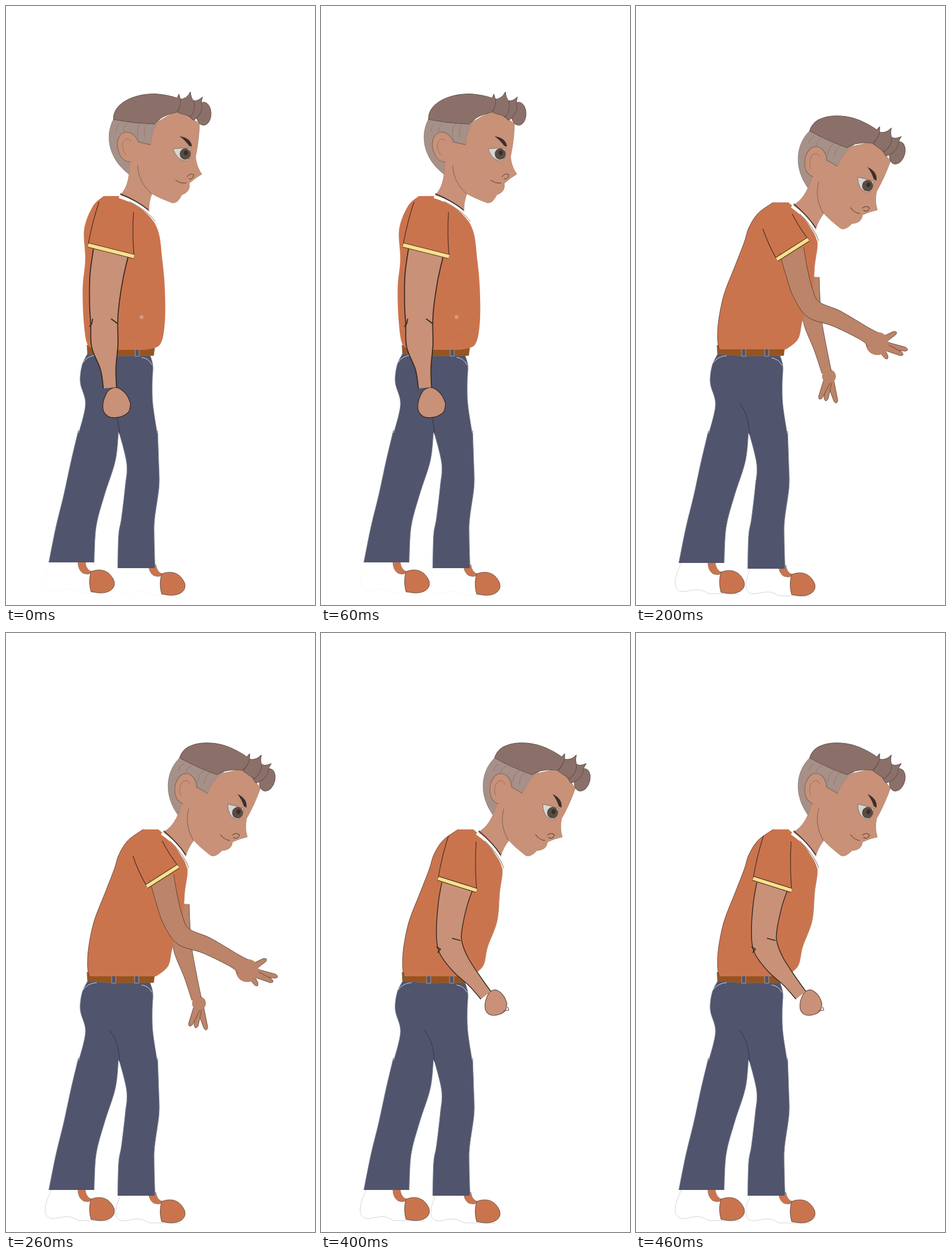
An HTML page that plays this animation: 538 by 1040 pixels, repeating every 500 ms.

```html
<!DOCTYPE html>
<html lang="en">
<head>
<meta charset="utf-8">
<title>Leaning man</title>
<style>
  html, body { margin: 0; width: 100%; height: 100%; overflow: hidden; background: #fff; }
  svg { display: block; width: 100vw; height: 100vh; }
  path { stroke-linejoin: round; }
</style>
</head>
<body>
<svg id="stage" viewBox="0 0 538 1040"></svg>
<script>
const SHIRT = '#ca744e', SKIN = '#c89178', SHADE = '#bc8468', JEANS = '#50546d';
const HAIR = '#8a7069', SIDE = '#a69087', BELT = '#96541f', TRIM = '#fbe08c', INK = '#33271f';
const STEP = 100;

const shape = (d, fill, stroke = 'none', width = 1) =>
  `<path d="${d}" fill="${fill}" stroke="${stroke}" stroke-width="${width}"/>`;
const line = (d, stroke = INK, width = 1) => shape(d, 'none', stroke, width);
const ellipse = (x, y, rx, ry, fill, stroke = 'none') =>
  `<ellipse cx="${x}" cy="${y}" rx="${rx}" ry="${ry}" fill="${fill}" stroke="${stroke}"/>`;
const group = (transform, body) => `<g transform="${transform}">${body}</g>`;

// Smooth curve through points, without its opening move.
function through(points) {
  const at = i => points[Math.max(0, Math.min(points.length - 1, i))];
  return points.slice(1).map((c, i) => {
    const b = at(i);
    const out = b.map((v, k) => v + (c[k] - at(i - 1)[k]) / 6);
    const into = c.map((v, k) => v - (at(i + 2)[k] - b[k]) / 6);
    return `C${out} ${into} ${c}`;
  }).join('');
}

// Band along joints [x, y, width]; a flat band measures its width horizontally.
function ribbon(joints, flat, fill, leftInk, rightInk = leftInk, width = 1) {
  const side = sign => joints.map(([x, y, w], i) => {
    const a = joints[Math.max(0, i - 1)], b = joints[Math.min(joints.length - 1, i + 1)];
    const angle = flat ? Math.PI / 2 : Math.atan2(b[1] - a[1], b[0] - a[0]);
    return [x - sign * Math.sin(angle) * w / 2, y + sign * Math.cos(angle) * w / 2];
  });
  const left = side(1), right = side(-1).reverse();
  const leftPath = through(left), rightPath = through(right);
  return shape(`M${left[0]}${leftPath}L${right[0]}${rightPath}Z`, fill)
    + line(`M${left[0]}${leftPath}`, leftInk, width)
    + line(`M${right[0]}${rightPath}`, rightInk, width);
}

function fist(x, y, rx, ry, ink) {
  const points = Array.from({ length: 13 }, (_, i) => {
    const a = i * Math.PI / 6, bump = 1 + .07 * Math.cos(3 * a - 1);
    return [x + rx * bump * Math.cos(a), y + ry * bump * Math.sin(a)];
  });
  return shape(`M${points[0]}${through(points)}Z`, SKIN, ink, 1.2);
}

// Fingers are [degrees, reach] from the middle of the palm.
function openHand(x, y, palm, fingers) {
  const finger = ([degrees, reach]) => group(`translate(${x} ${y}) rotate(${degrees})`,
    shape(`M0 -7L${reach - 5} -4Q${reach + 3} 0 ${reach - 5} 3L0 7Z`, SHADE, '#5c4439', .8));
  return fingers.map(finger).join('') + ellipse(x, y, palm, palm, SHADE);
}

function sleeve([x1, y1], [x2, y2], [sx1, sy1], [sx2, sy2]) {
  const cuff = `M${x1} ${y1}L${x2} ${y2}`;
  const seam = (sx, sy, x, y) => line(`M${sx} ${sy}Q${(sx + x) / 2 - 3} ${(sy + y) / 2} ${x} ${y}`, '#4a2d20', 1.2);
  return seam(sx1, sy1, x1, y1) + seam(sx2, sy2, x2, y2) + line(cuff, '#4f3b25', 8.5) + line(cuff, TRIM, 6);
}

const lock = shape('M0 0Q1 11 6 16Q10 30 1 43L-22 36Q-16 22 -19 13Q-6 13 0 0Z', HAIR, '#645049');
const strands = [198, 211, 235, 247].map((x, i) =>
  line(`M${x} 204q-9 8 -5 ${i < 2 ? 14 : 24}`, '#8a7770', .8)).join('');

const head = [
  shape('M187 197C172 225 178 265 214 292L222 240L252 241Q253 215 268 196Z', SIDE, '#8a7c76', .8),
  strands,
  shape('M337 204Q336 235 330 262Q332 280 341 292Q330 298 319 308Q322 322 306 328Q299 343 290 342Q268 334 254 326Q248 342 249 357Q225 345 199 328Q216 312 215 272L226 236L252 241Q254 215 266 200L300 180Z', SKIN, '#a98270', .7),
  shape('M229 238C222 212 192 212 194 244Q198 270 217 271L230 256Z', SKIN),
  line('M252 241L231 236C222 212 192 212 194 244Q198 270 217 271', '#756158'),
  line('M218 235C206 222 196 244 209 259', '#8b6b5b', .8),
  line('M229 276Q230 305 253 326', '#806052'),
  ellipse(344, 187, 13, 20, HAIR, '#645049'),
  group('translate(342 158) rotate(22)', lock),
  group('translate(321 149)', lock),
  shape('M187 197C186 165 232 150 265 153Q285 155 298 160L301 153L304 163Q304 175 298 184Q270 190 258 205Q222 204 187 197Z', HAIR, '#645049'),
  shape('M302 226Q322 229 324 244L319 243Q312 233 302 226Z', '#3b302d'),
  shape('M291 248Q306 246 320 247Q324 262 315 269Q298 269 291 248Z', '#d9d6d2', '#6f625b', .8),
  ellipse(312, 257, 9.5, 10, '#5b4c43'), ellipse(313, 255, 3.5, 4, '#392e28'),
  line('M295 302Q304 309 314 307', '#5c3b30'),
  line('M315 297Q320 289 327 293Q326 302 318 300', '#5c3b30'),
  line('M197 331Q240 344 259 373', '#fff', 5),
  line('M199 326Q228 338 248 354', INK, 1.6), line('M214 339Q246 355 260 374', '#665044', .8)
].join('');

const shoe = sole => [
  line('M79 967C60 1005 68 1020 88 1016S112 1012 126 1020L180 1021', sole, .8),
  shape('M125 965L138 967Q140 981 150 983Q146 990 134 986Q125 980 125 965Z', SHIRT, '#806a60', .6),
  shape('M148 983C166 976 181 982 188 999C192 1012 180 1021 162 1020L148 1018Q143 1000 148 983Z', SHIRT, '#665047')
].join('');

const EDGE = '#8f929d';
const legs = [
  ribbon([[161, 738, 70], [152, 790, 77], [136, 850, 71], [122, 905, 70], [114, 967, 79]], true, JEANS, EDGE),
  ribbon([[230, 738, 68], [238, 795, 56], [237, 835, 59], [230, 890, 58], [227, 920, 62], [227, 977, 65]], true, JEANS, EDGE),
  ribbon([[196, 604, 108], [194, 625, 124], [192, 655, 126], [197, 692, 118], [195, 742, 137]], true, JEANS, '#c9cad0'),
  line('M180 690Q195 705 198 745', '#343743'),
  line('M134 620Q142 608 158 607M236 611Q249 613 254 624', '#d8dae0')
].join('');

const belt = loops => shape('M141 589L259 592L257 607L186 608L142 604Z', BELT, '#7d6757', .8)
  + loops.map(x => shape(`M${x} 594h7v14h-7z`, JEANS, '#aeb2bd', .8)).join('');

const upright = {
  legs: -1, sole: '#f6f6f6', belt: belt([225]), head: '',
  torso: ribbon([[184, 330, 28], [194, 348, 86], [200, 388, 128], [205, 440, 134], [205, 490, 143], [206, 550, 141], [205, 588, 126], [200, 597, 84]], true, SHIRT, 'none')
    + ellipse(236, 540, 3.5, 3.5, '#d9977d') + line('M195 580Q240 574 270 560', '#c36c46', .8)
};
const bent = {
  legs: 0, sole: '#c8c8c8', belt: belt([184, 224]), head: 'translate(183.8 -27.5) rotate(17.65)',
  torso: ribbon([[252, 341, 26], [249, 360, 73], [250, 385, 107], [252, 410, 127], [242, 450, 138], [230, 500, 153], [217, 545, 146], [212, 578, 140], [203, 596, 116]], true, SHIRT, '#6b4838', '#b98468')
};

const hanging = fist(192, 690, 24, 26, INK)
  + ribbon([[183, 426, 62], [175, 470, 58], [171, 520, 51], [171, 552, 47], [172, 590, 46], [178, 630, 27], [181, 663, 23]], false, SKIN, INK, INK, 1.7)
  + line('M145 557L149 552L151 543M183 543L195 552', INK, 1.8)
  + sleeve([143, 415], [223, 435], [162, 340], [222, 358]);

const lowered = fist(361, 650, 21, 22, '#8c6a5b')
  + ribbon([[267, 438, 54], [273, 471, 53], [283, 510, 47], [298, 543, 41], [308, 569, 42], [329, 600, 28], [345, 631, 22]], false, SKIN, INK, INK, 1.3)
  + line('M278 543L281 547L280 554M302 529L315 537', INK, 1.6)
  + sleeve([228, 436], [299, 430], [222, 350], [272, 363]);
const loweredFar = fist(285, 667, 20, 23, '#92776b')
  + ribbon([[273, 590, 24], [273, 620, 22], [277, 648, 22]], false, SKIN, '#6b5146');

const reaching = openHand(420, 586, 20, [[-30, 40], [12, 55], [24, 50], [57, 33]])
  + ribbon([[271, 424, 43], [280, 463, 39], [291, 499, 36], [309, 527, 33], [350, 543, 29], [398, 569, 25], [412, 579, 30]], false, SHADE, '#5c4439')
  + sleeve([245, 440], [300, 405], [221, 387], [272, 361]);
const reachingFar = openHand(336, 643, 12, [[75, 49], [98, 44], [113, 44]])
  + ribbon([[308, 470, 22], [306, 500, 28], [307, 545, 32], [321, 595, 22], [332, 636, 17]], false, SHADE, '#705348');

const drawnBack = fist(304, 643, 19, 22, '#6b5146') + line('M317 656L327 655L325 649', '#6b5146', 1.2)
  + ribbon([[237, 440, 55], [229, 472, 50], [223, 518, 44], [226, 547, 43], [243, 576, 35], [268, 605, 25], [287, 629, 22]], false, SKIN, INK, INK, 1.4)
  + line('M201 545L208 549L203 555M228 530L243 534', INK, 1.8)
  + sleeve([204, 426], [271, 447], [222, 352], [270, 362]);

const figure = (body, arm, farArm = '', drop = 0) => group(`translate(0 ${drop})`,
  group(`translate(0 ${body.legs})`, shoe(body.sole) + group('translate(123 4)', shoe(body.sole)) + legs)
  + body.belt + farArm + body.torso + group(body.head, head) + arm);

const stage = document.getElementById('stage');
stage.innerHTML = [
  figure(upright, hanging),
  figure(bent, lowered, loweredFar, -2.5),
  figure(bent, reaching, reachingFar),
  figure(bent, lowered, loweredFar, -1),
  figure(bent, drawnBack)
].join('');
const poses = [...stage.children];

let start;
function draw(now) {
  start ??= now;
  const current = Math.floor((now - start) / STEP) % poses.length;
  poses.forEach((pose, i) => pose.setAttribute('visibility', i === current ? 'visible' : 'hidden'));
  requestAnimationFrame(draw);
}
requestAnimationFrame(draw);
</script>
</body>
</html>
```
